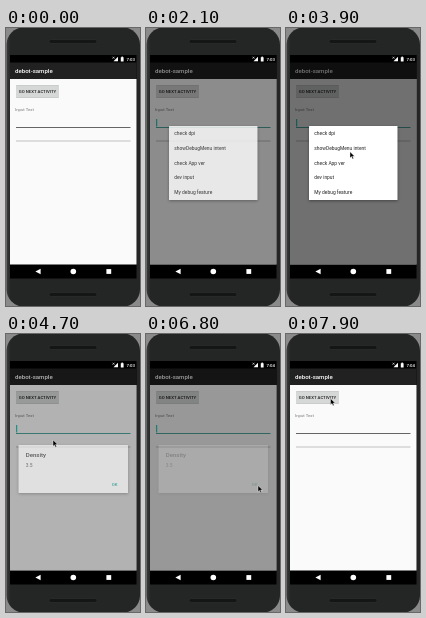
Recreate the animation shown at these times as an HTML page. Size 134 px wide and 278 px high, loop 8000 ms.

```html
<!DOCTYPE html>
<html lang="en">
<head>
<meta charset="utf-8">
<title>Debug menu demo</title>
<style>
  html, body { margin: 0; width: 100%; height: 100%; overflow: hidden; background: #8a8a8a; }
  svg { display: block; width: 134px; height: 278px; font-family: Roboto, sans-serif; }
  .medium { font-weight: 500; }
  .title { font-size: 6.1px; }
  .body { font-size: 4.9px; }
  .small { font-size: 4.3px; }
  .card { fill: #fff; filter: drop-shadow(0 1px 1.5px #0006); }
</style>
</head>
<body>
<svg viewBox="0 0 134 278">
  <defs>
    <linearGradient id="shell">
      <stop offset="0" stop-color="#393a3a"/>
      <stop offset=".03" stop-color="#242525"/>
    </linearGradient>
  </defs>
  <rect x=".6" y="-.5" width="133.4" height="279" rx="17" fill="url(#shell)"/>
  <g fill="#141515" stroke="#303131" stroke-width=".6">
    <rect x="43" y="11.5" width="48" height="4" rx="2"/>
    <rect x="43" y="264.5" width="48" height="4" rx="2"/>
  </g>

  <rect x="4" y="27" width="126.5" height="223.5"/>
  <rect x="4" y="34.5" width="126.5" height="16.5" fill="#212121"/>
  <rect x="4" y="51" width="126.5" height="185.5" fill="#fafafa"/>
  <text class="title medium" x="9" y="45" fill="#fff">debot-sample</text>
  <rect x="10" y="57.5" width="43" height="12" rx=".7" fill="#d6d7d7" style="filter:drop-shadow(0 .5px .5px #0007)"/>
  <text class="small medium" x="31.5" y="65.2" text-anchor="middle" fill="#222">GO NEXT ACTIVITY</text>
  <text class="small" x="9" y="82.6" fill="#777">Input Text</text>
  <path id="underline" d="M10 99.5H124.5" stroke-width=".9"/>
  <path d="M10 113H124.5" stroke="#999" stroke-width=".6"/>
  <path id="caret" d="M10.7 91V98.5" stroke="#009688" stroke-width=".8"/>

  <rect id="dim" x="4" y="27" width="126.5" height="209.5"/>

  <g fill="#fff">
    <path d="M107.5 33.2h4.5v-4.5z"/>
    <path d="M106.5 28.7l2 2m0-2l-2 2" stroke="#fff" stroke-width=".6"/>
    <path d="M114.8 29.2h.8v-.6h1.2v.6h.8v4.2h-2.8z"/>
    <text id="clock" class="small medium" x="128.9" y="32.8" text-anchor="end"></text>
    <path d="M34.6 240.8v5.4l-5.2-2.7z"/>
    <circle cx="67.3" cy="243.5" r="2.8"/>
    <rect x="100.4" y="241.1" width="4.8" height="4.8"/>
  </g>

  <g id="menu">
    <rect class="card" x="23" y="98" width="88.5" height="74" rx=".6"/>
  </g>
  <g id="density">
    <rect class="card" x="12.5" y="111" width="109.5" height="48" rx=".6"/>
    <text class="title medium" x="19.7" y="123.2" fill="#222">Density</text>
    <text class="body" x="19.7" y="132.5" fill="#444">3.5</text>
    <text class="small medium" x="105.7" y="152.2" fill="#009688">OK</text>
  </g>
  <path id="pointer" d="M0 0V6.2L1.5 4.9 2.5 7.2 3.6 6.7 2.6 4.5H4.6Z" stroke="#fff" stroke-width=".4"/>
</svg>
<script>
const $ = id => document.getElementById(id);
const LOOP = 8000;

["check dpi", "showDebugMenu intent", "check App ver", "dev input", "My debug feature"].forEach((label, i) => {
  const text = document.createElementNS("http://www.w3.org/2000/svg", "text");
  text.setAttribute("class", "body");
  text.setAttribute("x", 28.3);
  text.setAttribute("y", 107.2 + i * 14.7);
  text.setAttribute("fill", "#222");
  text.textContent = label;
  $("menu").append(text);
});

// Pointer stops: time, x, y
const stops = [
  [2900, 133, 205], [3700, 70, 130], [4300, 47, 106], [5400, 47, 106], [5800, 103, 144],
  [6300, 112, 151.5], [7000, 112, 151.5], [7700, 44.5, 64.5], [8000, 44.5, 64.5]
];

const ramp = (t, from, to) => Math.min(1, Math.max(0, (t - from) / (to - from)));
const ease = p => p * p * (3 - 2 * p);
const show = (id, opacity) => $(id).setAttribute("opacity", opacity);

function movePointer(t) {
  const next = stops.findIndex(stop => stop[0] > t);
  show("pointer", next > 0 ? 1 : 0);
  if (next < 1) return;
  const [t0, x0, y0] = stops[next - 1], [t1, x1, y1] = stops[next];
  const p = ease(ramp(t, t0, t1));
  $("pointer").setAttribute("transform", `translate(${x0 + (x1 - x0) * p} ${y0 + (y1 - y0) * p})`);
}

function draw(now) {
  const t = now % LOOP;
  const focused = t > 1900 && t < 7000;
  show("menu", ramp(t, 1900, 2150) - ramp(t, 4480, 4650));
  show("density", ramp(t, 4580, 4780) - ramp(t, 6660, 6830));
  show("dim", 0.55 * (ramp(t, 1900, 2150) - 0.5 * ramp(t, 4480, 4620)
    + 0.5 * ramp(t, 4690, 4880) - ramp(t, 6740, 6950)));
  show("caret", focused ? 1 : 0);
  $("underline").setAttribute("stroke", focused ? "#3f9f95" : "#555");
  $("clock").textContent = t < 5000 ? "7:03" : "7:04";
  movePointer(t);
  requestAnimationFrame(draw);
}
requestAnimationFrame(draw);
</script>
</body>
</html>
```
